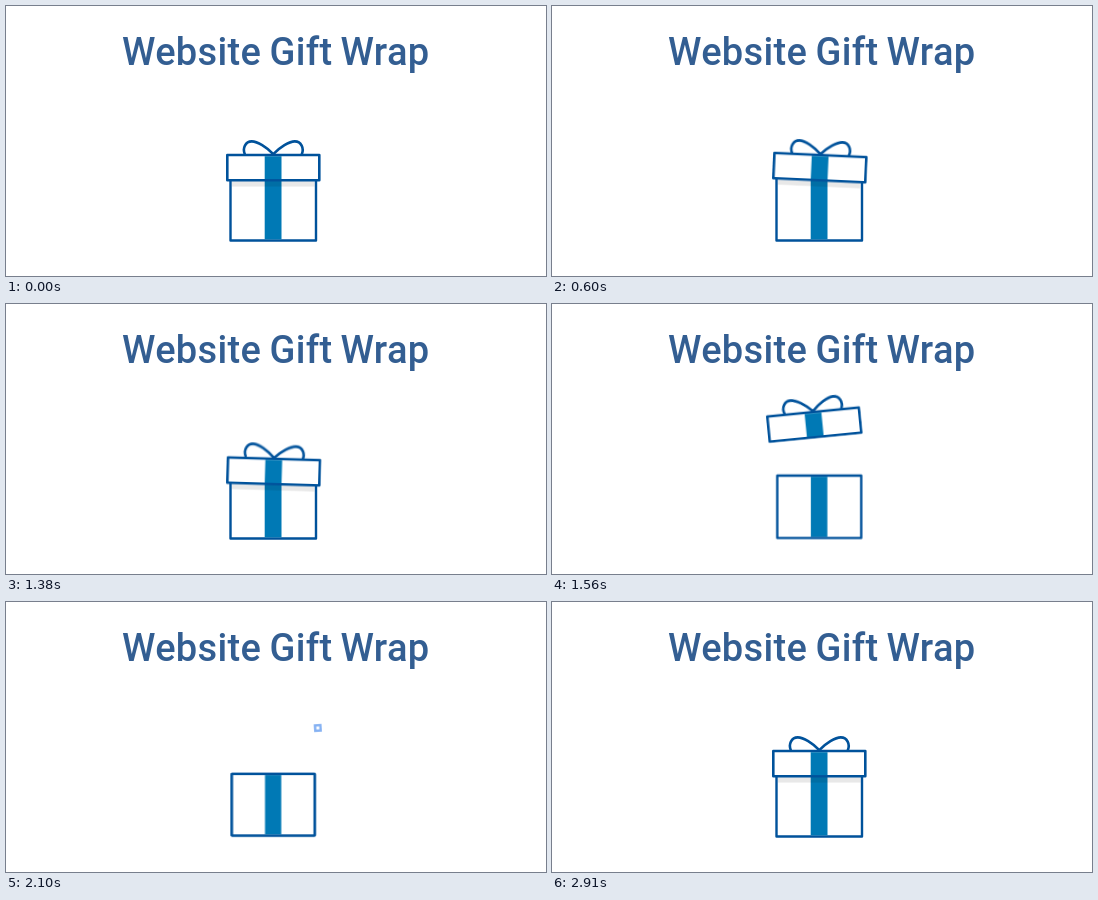
An HTML page for the animation above (3540 ms loop, 540 by 270 pixels).

```html
<!DOCTYPE html>
<html lang="en">
<head>
<meta charset="utf-8">
<title>Website Gift Wrap</title>
<style>
html, body { margin: 0; width: 100%; height: 100%; overflow: hidden; background: #fff; }
svg { display: block; width: 540px; height: 270px; }
text { font: 500 38px Roboto, "Open Sans", sans-serif; letter-spacing: .3px; fill: #335e92; }

.line { fill: #fff; stroke: #00529b; stroke-width: 2.6; stroke-linejoin: round; stroke-linecap: round; }
.wall { stroke-width: 2.4; }
.band { fill: #0079b5; }
.burst { fill: none; stroke: #0a63e6; stroke-width: 2.8; }

.box, .lid, .bow, .shade, .front, .ray, .bit, .square {
  animation: 3540ms ease-in-out infinite;
}
.box { animation-name: box; transform-origin: 267px 202.7px; }
.lid { animation-name: lid; transform-origin: 267px 174px; }
.bow { animation-name: bow; transform-origin: 267px 148px; }
.shade { animation-name: shade; }
.front { animation-name: front; animation-timing-function: step-end; }
.ray { animation-name: ray; animation-timing-function: linear; stroke-dasharray: 17 200; }
.bit { animation-name: bit; animation-timing-function: ease-out; stroke-width: 2.4; }
.square { animation-name: square; animation-timing-function: ease-out; stroke-width: 2.4; }

@keyframes box {
  0%, 40.68% { transform: scale(1); }
  43% { transform: scale(.975); }
  46%, 58.47% { transform: scale(1); animation-timing-function: linear; }
  59.32% { transform: scale(.967); animation-timing-function: ease-in; }
  62.71% { transform: scale(0); animation-timing-function: ease-out; }
  68.64% { transform: scale(1.21); }
  69.49% { transform: scale(1.22); }
  74.58% { transform: scale(.98); }
  77.12%, 100% { transform: scale(1); }
}
@keyframes lid {
  0% { transform: rotate(0deg); }
  4.24% { transform: rotate(-4deg); }
  8.47% { transform: rotate(4deg); }
  12.71% { transform: rotate(-4deg); }
  16.95% { transform: rotate(2.6deg); }
  21.19% { transform: rotate(0deg); }
  31.36% { transform: translate(0, 0) rotate(0deg) scale(1); }
  35% { transform: translate(0, 3px) rotate(-2deg) scale(1); }
  38.98% { transform: translate(0, 5.8px) rotate(1.7deg) scale(1); }
  40.68% { transform: translate(0, 6px) rotate(0deg) scale(1); animation-timing-function: ease-out; }
  44.92% { transform: translate(-4px, -44px) rotate(-6deg) scale(1); }
  46.61% { transform: translate(4px, -46px) rotate(5deg) scale(1); animation-timing-function: ease-in; }
  50% { transform: translate(0, 26px) rotate(-1deg) scale(.8); animation-timing-function: linear; }
  51.69%, 62.7% { transform: translate(0, 32px) rotate(0deg) scale(.6); }
  62.71% { transform: translate(0, 0) scale(0); animation-timing-function: ease-out; }
  68.64% { transform: translate(0, -.8px) scale(1.21); }
  69.49% { transform: translate(0, -.8px) scale(1.22); }
  74.58% { transform: translate(0, 0) scale(.98); }
  77.12%, 100% { transform: translate(0, 0) scale(1); }
  51.7%, 62.7% { opacity: 0; }
  0%, 51.69%, 62.71%, 100% { opacity: 1; }
}
@keyframes bow {
  0%, 31.36% { transform: rotate(0deg); }
  38.98% { transform: rotate(2deg); }
  42%, 62.71% { transform: rotate(0deg); }
  68.64% { transform: scale(1.03); }
  73.73% { transform: scale(1); }
  77.12% { transform: scale(1.04, 1.16); }
  82.2%, 100% { transform: scale(1); }
}
@keyframes shade {
  0%, 40.68%, 62.71%, 100% { opacity: 1; }
  42%, 62.7% { opacity: 0; }
}
@keyframes front {
  0%, 62.71% { visibility: hidden; }
  46.61% { visibility: visible; }
}
@keyframes ray {
  0%, 45.76% { stroke-dashoffset: 18; visibility: hidden; }
  45.77% { stroke-dashoffset: 18; visibility: visible; }
  50% { stroke-dashoffset: -30; animation-timing-function: ease-out; }
  55.08% { stroke-dashoffset: -60; visibility: visible; }
  55.09%, 100% { stroke-dashoffset: -60; visibility: hidden; }
}
@keyframes bit {
  0%, 45.76% { transform: translate(267px, 188px) rotate(-90deg) scale(.4); opacity: 0; }
  46.61% { opacity: 1; }
  50% { transform: translate(var(--x), var(--y)) rotate(0deg) scale(1); opacity: 1; }
  53.5% { opacity: 1; }
  57.5%, 100% { transform: translate(var(--u), var(--v)) rotate(70deg) scale(.6); opacity: 0; }
}
@keyframes square {
  0%, 50% { transform: translate(285px, 182px) rotate(-120deg); opacity: 0; }
  50.5% { opacity: 1; }
  57% { opacity: 1; animation-timing-function: linear; }
  59.32% { transform: translate(311.8px, 126px) rotate(-4deg); opacity: .52; }
  61.02%, 100% { transform: translate(313px, 124px) rotate(10deg); opacity: 0; }
}
</style>
</head>
<body>
<svg viewBox="0 0 540 270">
  <defs>
    <g id="body">
      <rect class="line wall" x="224.5" y="171" width="85.5" height="63.5"/>
      <rect class="band" x="258.7" y="172.2" width="16.8" height="61.2"/>
    </g>
    <path id="loop" d="M0 0C-6.5-7-16-12.8-21.5-12.8C-28-12.8-31-6-28.5 0"/>
    <path id="cross" d="M-5-5L5 5M5-5L-5 5"/>
  </defs>

  <text y="59"><tspan x="116">Website</tspan> <tspan x="263.5">Gift</tspan> <tspan x="334.5">Wrap</tspan></text>

  <use href="#body" class="box"/>

  <g class="lid">
    <g class="shade"><rect x="226" y="175" width="82.5" height="5.6" opacity=".09"/></g>
    <g class="bow line">
      <use href="#loop" x="267.3" y="148.2"/>
      <use href="#loop" transform="translate(267.3 148.2) scale(-1 1)"/>
    </g>
    <rect class="line" x="221.3" y="149" width="92" height="25.3"/>
    <rect class="band" x="258.7" y="150.2" width="16.8" height="22.9"/>
  </g>

  <g class="burst">
    <g transform="translate(234 165) rotate(-45)"><line class="ray" y2="-60"/></g>
    <g transform="translate(253 149) rotate(-30)"><line class="ray" y2="-60"/></g>
    <g transform="translate(267 150)"><line class="ray" y2="-60"/></g>
    <g transform="translate(281 148) rotate(30)"><line class="ray" y2="-60"/></g>
    <g transform="translate(300 165) rotate(45)"><line class="ray" y2="-60"/></g>
    <g class="bit" style="--x:245px;--y:132px;--u:234px;--v:112px"><use href="#cross"/></g>
    <g class="bit" style="--x:265px;--y:145px;--u:264px;--v:118px"><use href="#cross" transform="rotate(-25)"/></g>
    <g class="bit" style="--x:301.5px;--y:128px;--u:314px;--v:108px"><circle r="7"/></g>
    <rect class="square" x="-2.7" y="-2.7" width="5.4" height="5.4"/>
  </g>

  <g class="front"><use href="#body" class="box"/></g>
</svg>
</body>
</html>
```
